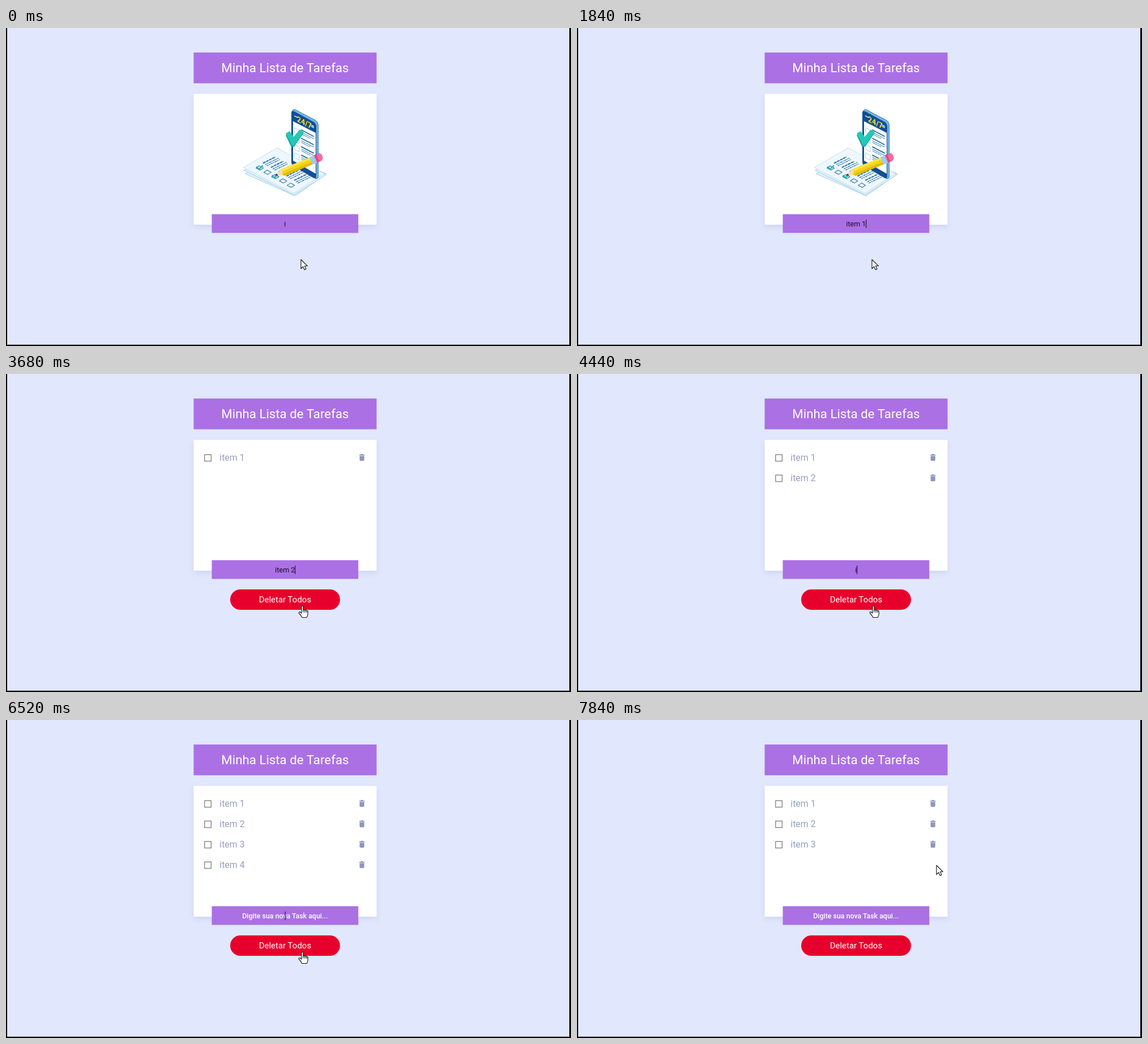
These frames come from a looping animation (998x561 px, 8000 ms). An HTML page:

```html
<!DOCTYPE html>
<html lang="pt-BR">
<head>
<meta charset="utf-8">
<title>Minha Lista de Tarefas</title>
<style>
  html, body { margin: 0; width: 100%; height: 100%; overflow: hidden; background: #000; }
  svg { display: block; width: 998px; height: 561px; }
  text { font-family: Roboto, sans-serif; }
  .middle { text-anchor: middle; }
  .purple { fill: #ab70e4; }
  .card { fill: #fff; filter: drop-shadow(0 4px 5px rgba(80, 90, 150, .12)); }
  .ink { fill: none; stroke: #2a6fa5; }
</style>
</head>
<body>
<svg viewBox="0 0 998 561">
  <defs>
    <g id="row">
      <rect x="350.8" y="142.3" width="11.5" height="11.5" fill="#fff" stroke="#666" stroke-width="1.1"/>
      <path fill="#8f96ba" d="M624 142.2h2.4l.7-1.2h3.2l.7 1.2h2.5v1.5H624zM624.6 144.6h8.2v7q0 1.7-1.7 1.7h-4.8q-1.7 0-1.7-1.7z"/>
    </g>
  </defs>

  <path fill="#e1e7fd" d="M2 0H995V558.7H2z"/>
  <path class="purple" d="M331.5 43.3H654.6V97.5H331.5z"/>
  <text class="middle" x="492.9" y="78.3" font-size="22.3" fill="#fff">Minha Lista de Tarefas</text>
  <path class="card" d="M331.5 116.3H654.6V347H331.5z"/>

  <g id="art" stroke-linejoin="round" stroke-linecap="round">
    <g fill="#e3f1fa" stroke="#8cc4df" stroke-width=".8">
      <path d="M423 257 480 224 566 257 511 296z"/>
      <path d="M421 251 480 218 565 259 509 294.5z"/>
      <path fill="#eef7fd" stroke="#b5dcee" d="M419.5 246 479 211.5 562 257 508 291.5z"/>
    </g>
    <g id="paperRows"></g>

    <path fill="#76b6e3" stroke="#1c5c9a" stroke-width=".8" d="M505 148q1-5 6-4l36 19q4 3 4.500 8v91q-.5 4-4 4l-38-23q-4-3-4.500-8z"/>
    <path fill="#124f92" d="M504 150q0-5 5-3l35 19q4 3 4 8v87q0 5-4 4l-36-21q-4-3-4-8z"/>
    <path fill="#fbfeff" d="M507 164.500 547 185V257L507 234z"/>
    <path stroke="#fff" stroke-width="1.300" d="M509.500 155l5 2.600M539 171l4.500 2.300M539 173.500l4.500 2.300"/>
    <text class="middle" transform="matrix(.88 .46 0 1 527 171.500)" font-size="14" font-weight="700" fill="#f6df2b">24/7</text>
    <g id="phoneRows"></g>

    <path fill="#149f92" d="M494 189l7-4 7 10 12-14 6 4-17 24-5 1z"/>
    <path fill="#24c8b7" d="M494 186l7-4 7 10 11-13 7 5-18 24-3-1z"/>

    <g transform="translate(474.500 260.500) rotate(-22.500)">
      <path fill="#f7dcae" d="M0 0 15-6 17 6z"/>
      <path fill="#173b55" d="M0 0 5-2 5.500 2z"/>
      <path fill="#f3d313" d="M14-6H70V7H16L13 3 16 0z"/>
      <path fill="#ffe545" d="M14-6H70V-2H15z"/>
      <path fill="#e2b808" d="M15 3H70V7H16z"/>
      <path fill="#9fcbed" d="M69-6.500h10V7.500H69z"/>
      <path fill="#e84584" d="M78-7h6q7 0 7 7t-7 7.500h-6z"/>
      <path fill="#f36ca0" d="M84-7q7 0 7 7t-7 7.500q-4-7 0-14.500z"/>
    </g>
  </g>

  <g id="rows" font-size="15.9" fill="#959fbd"></g>

  <path class="purple" d="M363.5 328.500H622.300V361.600H363.5z"/>
  <text id="hint" class="middle" x="492.8" y="349.800" font-size="12.4" font-weight="500" fill="#fff">Digite sua nova Task aqui...</text>
  <text id="entry" class="middle" x="492.9" y="349.800" font-size="12.6" fill="#170c26" xml:space="preserve"></text>
  <rect id="caret" y="338" width="1.100" height="15" fill="#170c26"/>

  <g id="button">
    <rect x="396" y="380" width="194" height="36" rx="18" fill="#e8002c"/>
    <text class="middle" x="492.900" y="403.300" font-size="15" fill="#fff">Deletar Todos</text>
  </g>

  <g id="pointer" fill="#fff" stroke="#111" stroke-width="1.100" stroke-linejoin="round">
    <path id="arrow" d="M0 .5V16.500L3.700 13 6.300 18.500 9 17.200 6.500 11.800H11.500z"/>
    <path id="hand" d="M1 3q0-2 1.500-2T4 3V9q2-2 3 .2 2-1.300 3 .6 2-.8 2.200 1.500V15q0 3-2 6.500H2Q0 17.500-3.500 14-4.500 11.500-2 11.800L1 14zM4 9v3.500M7 9.500v3.500M10 10v3"/>
  </g>
</svg>

<script>
const LOOP = 8000, BLINK = 500, DELETE_AT = 7760;
const $ = id => document.getElementById(id);
const show = (id, on) => { $(id).style.display = on ? '' : 'none'; };

// Times of the six keystrokes of "item N", then of the Enter key.
const rounds = [
  [0, 120, 320, 520, 920, 1600, 2080],
  [2720, 2880, 3000, 3080, 3240, 3360, 3760],
  [4400, 4520, 4600, 4680, 4800, 4920, 5120],
  [5680, 5840, 5920, 6000, 6080, 6160, 6200]
];
const presses = rounds.flat();

// Pointer path: time, x, y.
const path = [
  [0, 521, 408], [7040, 521, 408], [7240, 520, 406.500],
  [7520, 655, 218], [7680, 635, 256], [LOOP, 635, 256]
];

function pointerAt(t) {
  const i = path.findIndex(p => p[0] > t);
  const [t0, x0, y0] = path[i - 1], [t1, x1, y1] = path[i];
  const u = (t - t0) / (t1 - t0), k = u * u * (3 - 2 * u);
  return [x0 + (x1 - x0) * k, y0 + (y1 - y0) * k];
}

function drawArtRows() {
  let paper = '', phone = '';
  for (let i = 0; i < 5; i++) {
    const x = 448 + 13.800 * i, y = 247 + 7.600 * i;
    paper += `<path class="ink" stroke-width="1.100" d="M${x - 6.500} ${y}l6-3.800 7 3.800-6 3.800z"/>
      <path class="ink" stroke-width="2" stroke-dasharray="5 1" stroke-linecap="butt" d="M${x + 6} ${y - 8.500}l22-11"/>
      <path class="ink" stroke-width="1.300" stroke-dasharray="4 1 2 1" stroke-linecap="butt" d="M${x + 9.500} ${y - 6}l24-11.500M${x + 12.500} ${y - 3.800}l23-11"/>`;
    if (i % 2 == 0 && i < 4)
      paper += `<path fill="none" stroke="#20b9aa" stroke-width="2.400" d="M${x - 5} ${y - 2}l4 4 6-6"/>`;
  }
  for (let i = 0; i < 4; i++) {
    const y = 182 + 14.800 * i;
    phone += `<path fill="#fff" stroke="#a9cfe6" d="M510 ${y - 6}l8 4.300v8.700l-8-4.500z"/>
      <path class="ink" stroke-width="1.800" d="M522 ${y - 2}l21 11"/>
      <path class="ink" stroke-width="1" stroke-dasharray="4 1" d="M522 ${y + 2}l21 11M522 ${y + 5}l15 8"/>`;
  }
  $('paperRows').innerHTML = paper;
  $('phoneRows').innerHTML = phone;
}

function buildTaskRows() {
  $('rows').innerHTML = rounds.map((_, i) =>
    `<g transform="translate(0 ${36 * i})"><use href="#row"/><text x="377.300" y="153.400">item ${i + 1}</text></g>`
  ).join('');
}

function render(t) {
  const added = rounds.filter(r => t >= r[6]).length;
  const count = t < DELETE_AT ? added : 3;
  const keys = added < rounds.length ? rounds[added].slice(0, 6) : [];
  const typed = keys.filter(k => t >= k).length;
  const text = `item ${added + 1}`.slice(0, typed);

  show('art', count == 0);
  show('button', count > 0);
  [...$('rows').children].forEach((row, i) => { row.style.display = i < count ? '' : 'none'; });

  show('hint', !text);
  $('entry').textContent = text;
  const width = text ? $('entry').getComputedTextLength() : 0;
  const lastPress = Math.max(...presses.filter(k => k <= t));
  $('caret').setAttribute('x', 492.600 + width / 2);
  show('caret', t >= 120 && t < DELETE_AT && Math.floor((t - lastPress) / BLINK) % 2 == 0);

  const [x, y] = pointerAt(t);
  const onButton = count > 0 && x > 396 && x < 590 && y > 380 && y < 416;
  const onTrash = count == 4 && x > 622 && x < 637 && y > 247 && y < 263;
  $('pointer').setAttribute('transform', `translate(${x} ${y})`);
  show('hand', onButton || onTrash);
  show('arrow', !(onButton || onTrash));
}

drawArtRows();
buildTaskRows();
const start = performance.now();
function tick() {
  render((performance.now() - start) % LOOP);
  requestAnimationFrame(tick);
}
tick();
</script>
</body>
</html>
```
